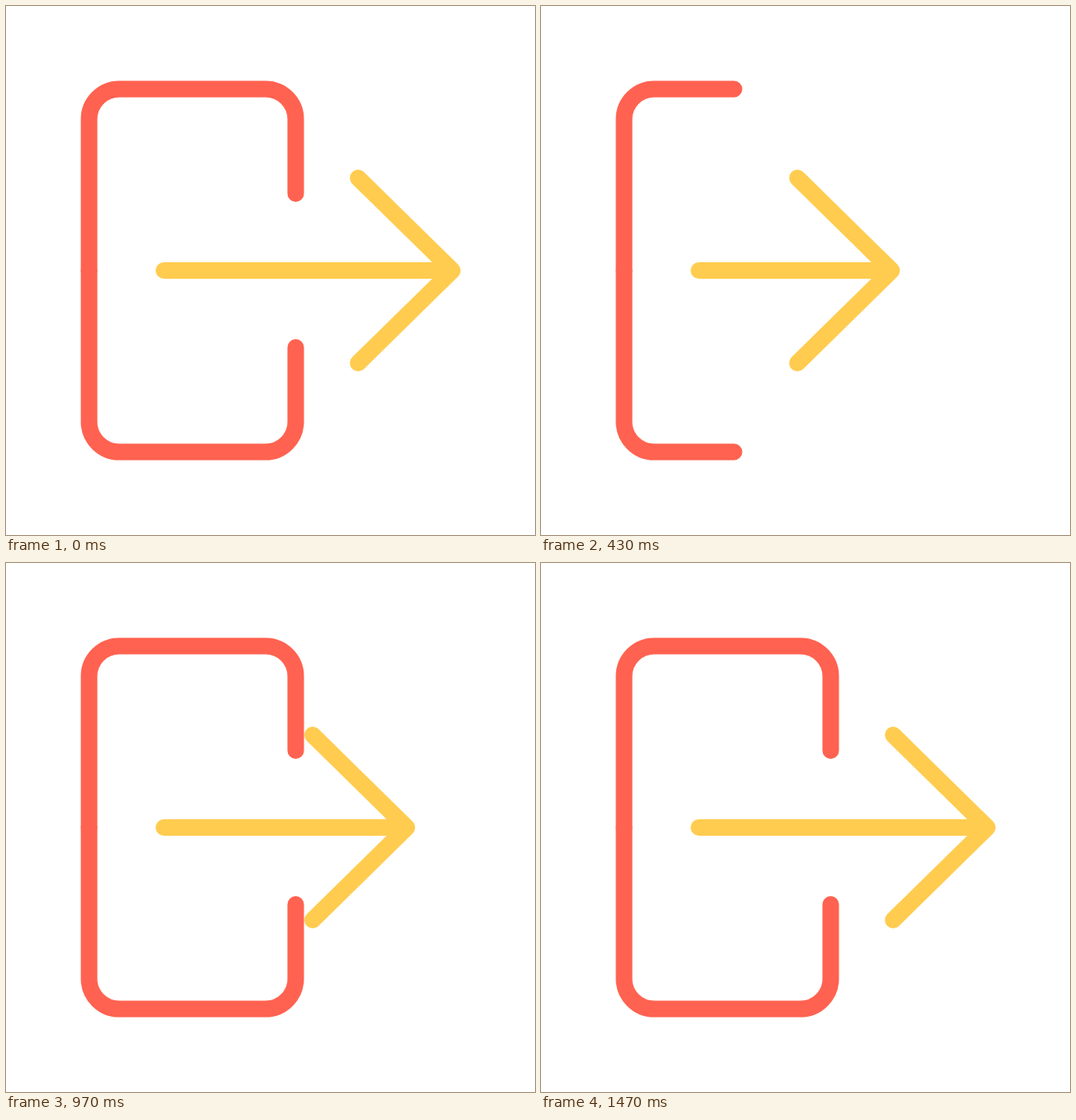
Animation, 640 px wide and 640 px high, one loop 2000 ms. Source, as an HTML page:

```html
<!DOCTYPE html>
<html lang="en">
<head>
<meta charset="utf-8">
<title>Exit icon</title>
<style>
  html, body { margin: 0; height: 100%; overflow: hidden; background: #fff; }
  svg { display: block; width: 100%; height: 100%; }
  path { fill: none; stroke-width: 20; stroke-linecap: round; stroke-linejoin: round; }
  #arrow { stroke: #ffcc50; }
  .door { stroke: #ff6250; }
</style>
</head>
<body>
<svg viewBox="0 0 640 640">
  <path id="arrow"/>
  <path class="door" d="M100.5 320V137a36.5 36.5 0 0 1 36.5-36.5H314a36.5 36.5 0 0 1 36.5 36.5V227"/>
  <path class="door" d="M100.5 320V503a36.5 36.5 0 0 0 36.5 36.5H314a36.5 36.5 0 0 0 36.5-36.5V413"/>
</svg>
<script>
  const LOOP = 2000, FPS = 30;
  // Keys are [tick, value] at 30 ticks per second.
  const arrowShift = [[0, 0], [14, -117.5], [22, 0], [30, -57.5], [38, 0], [41, 4], [44, 0]];
  const doorTrim = [[5, 0], [14, 236], [22, 0]];

  const arrow = document.getElementById('arrow');
  const doors = document.querySelectorAll('.door');
  const doorLength = doors[0].getTotalLength();

  const smooth = p => p * p * (3 - 2 * p);

  function valueAt(keys, tick) {
    if (tick <= keys[0][0]) return keys[0][1];
    for (let i = 1; i < keys.length; i++) {
      const [t0, v0] = keys[i - 1], [t1, v1] = keys[i];
      if (tick <= t1) return v0 + (v1 - v0) * smooth((tick - t0) / (t1 - t0));
    }
    return keys[keys.length - 1][1];
  }

  function draw(now) {
    // Ticks fall on times rounded to 10 ms, up to 4 ms early.
    const tick = Math.floor((now % LOOP + 4) * FPS / 1000);
    const tip = 540 + valueAt(arrowShift, tick);
    arrow.setAttribute('d', `M191 320H${tip}M${tip - 114} 208L${tip} 320L${tip - 114} 432`);
    const visible = doorLength - valueAt(doorTrim, tick);
    for (const door of doors) door.style.strokeDasharray = `${visible} 2000`;
  }

  const start = performance.now();
  function loop() {
    draw(performance.now() - start);
    requestAnimationFrame(loop);
  }
  loop();
</script>
</body>
</html>
```
